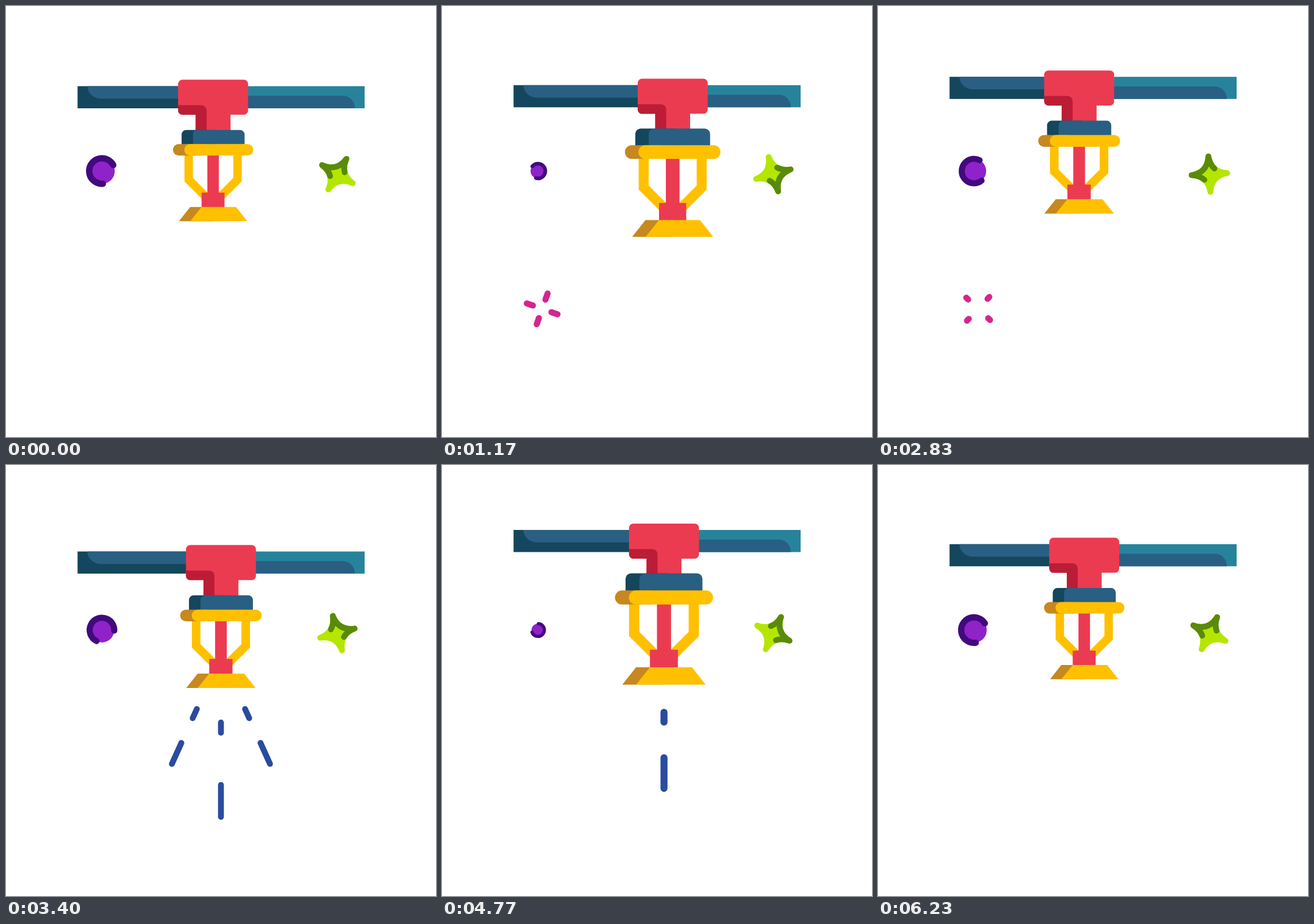
Recreate the animation shown at these times as an HTML page with a canvas. Size 747 px wide and 750 px high, loop 6.26 s.

```html
<!DOCTYPE html>
<html>
<head>
<meta charset="utf-8">
<style>
html, body { margin: 0; width: 100%; height: 100%; overflow: hidden; background: #fff; }
canvas { display: block; }
</style>
</head>
<body>
<canvas id="stage" width="747" height="750"></canvas>
<script>
const LOOP = 6260, STEPS = 188, CYCLE = 94, BURST = 47;
const RED = '#eb3b50', CRIMSON = '#bb1d37', BLUE = '#295f82', NAVY = '#14465d', TEAL = '#27839c';
const YELLOW = '#ffc000', OCHRE = '#c6881f', WATER = '#2a4b9f', PINK = '#d6258f';
const VIOLET = '#9022c9', INDIGO = '#420a7d', LIME = '#b4e600', MOSS = '#5a8a0a';
const c = document.getElementById('stage').getContext('2d');
const rad = deg => deg * Math.PI / 180;
const wave = (step, peak) => Math.cos(2 * Math.PI * (step - peak) / CYCLE);

// Quadratic ease-out over ten steps
function ease(t) {
  const x = Math.min(1, Math.max(0, t / 10));
  return 1 - (1 - x) ** 2;
}

function box(color, x, y, w, h, r = 0) {
  c.fillStyle = color;
  c.beginPath();
  c.roundRect(x, y, w, h, r);
  c.fill();
}

function poly(color, ...pts) {
  c.fillStyle = color;
  c.beginPath();
  for (const [x, y] of pts) c.lineTo(x, y);
  c.fill();
}

function group(x, y, draw) {
  c.save();
  c.translate(x, y);
  draw();
  c.restore();
}

function pen(color, width) {
  c.strokeStyle = color;
  c.lineWidth = width;
  c.lineCap = c.lineJoin = 'round';
}

// Line of which only the part between tail and front shows
function trimmed([x1, y1, x2, y2], tail, front) {
  const at = p => [x1 + (x2 - x1) * p, y1 + (y2 - y1) * p];
  const [ex, ey] = at(front);
  c.beginPath();
  c.moveTo(...at(tail));
  c.lineTo(ex, ey + 0.01);
  c.stroke();
}

function pipe(top) {
  group(0, top, () => {
    const h = 38.5;
    box(NAVY, 124.3, 0, 250, h);
    box(TEAL, 374, 0, 249, h);
    c.fillStyle = BLUE;
    c.beginPath();
    c.moveTo(141.5, 0);
    c.bezierCurveTo(141.5, 12, 152, 21.7, 165, 21.7);
    c.lineTo(375, 21.7);
    c.lineTo(375, 0);
    c.fill();
    c.beginPath();
    c.moveTo(374, 16.7);
    c.lineTo(585, 16.7);
    c.bezierCurveTo(597, 16.7, 606, 26, 606, h);
    c.lineTo(374, h);
    c.fill();
  });
}

function tee(x, y) {
  group(x, y, () => {
    c.beginPath();
    c.roundRect(-60.8, 0, 121.6, 61, 7.5);
    c.rect(-30.3, 50, 60.6, 42);
    c.fillStyle = RED;
    c.fill();
    c.clip();
    box(CRIMSON, -70, 44.3, 58.7, 60, [0, 9, 0, 0]);
  });
}

function head() {
  box(NAVY, -54.7, 0, 60, 25, [8, 0, 0, 0]);
  box(BLUE, -35, 0, 89.7, 25, [8, 8, 0, 0]);
  c.strokeStyle = YELLOW;
  c.lineWidth = 14.6;
  c.lineCap = 'butt';
  c.lineJoin = 'miter';
  for (const side of [-1, 1]) {
    c.beginPath();
    c.moveTo(side * 42.4, 40);
    c.lineTo(side * 42.4, 86.5);
    c.lineTo(side * 5, 123.9);
    c.stroke();
  }
  box(RED, -10, 40, 20, 75);
  box(OCHRE, -69.8, 24.5, 60, 20, 10);
  box(YELLOW, -50, 24.5, 119.8, 20, 10);
  box(RED, -20, 109, 39.8, 25.5);
  poly(OCHRE, [-39.8, 134], [0, 134], [0, 158.7], [-59.3, 158.7]);
  poly(YELLOW, [-20, 134], [39.8, 134], [59.3, 158.7], [-39.7, 158.7]);
}

// Each jet: start step, then its dashes
const jets = [
  [0, [0, 193.7, 0, 232.5], [0, 258.3, 0, 380]],
  [5, [-41.2, 190.2, -55.3, 221.2], [-67.7, 248.4, -99.5, 318.8],
      [41.2, 190.2, 55.3, 221.2], [67.7, 248.4, 99.5, 318.8]],
  [10, [-61.6, 170.3, -86.6, 199.5], [-98.3, 213.2, -124.4, 243.8],
       [66.4, 170.5, 89, 196.9], [100.3, 210.2, 129.5, 244.1]]
];

function water(phase) {
  pen(WATER, 10);
  for (const [start, ...dashes] of jets) {
    const t = phase - start;
    if (t > 0 && t <= 15) for (const d of dashes) trimmed(d, ease(t - 5), ease(t));
  }
}

function spark(step, phase) {
  if (phase <= 19 || phase > 43) return;
  group(174, 527, () => {
    c.rotate(rad(35.7 - 45 * wave(step, 17)));
    pen(PINK, 10.6);
    for (let i = 0; i < 4; i++) {
      c.rotate(Math.PI / 2);
      trimmed([10.7, 0, 28.3, 0], ease(phase - 33), ease(phase - 19));
    }
  });
}

function ring(step) {
  group(166.7, 287.2, () => {
    const s = 0.75 + 0.25 * wave(step, 0);
    c.scale(s, s);
    c.rotate(rad(29 + 360 * step / CYCLE));
    c.fillStyle = VIOLET;
    c.beginPath();
    c.arc(0, 0, 22.2, 0, 7);
    c.fill();
    pen(INDIGO, 11);
    c.beginPath();
    c.arc(0, 0, 22.2, rad(57), rad(303));
    c.stroke();
  });
}

function star(step) {
  const tip = 31, dip = 3, waist = tip / 4 + dip / 2, bend = (tip + dip) / 2;
  group(575.7, 292.6, () => {
    // Local axes: the dark tips lie at 0 and 90 degrees
    c.rotate(rad(-57 + 88.3 * wave(step, 32) - 45));
    c.beginPath();
    c.moveTo(tip, 0);
    c.quadraticCurveTo(dip, dip, 0, tip);
    c.quadraticCurveTo(-dip, dip, -tip, 0);
    c.quadraticCurveTo(-dip, -dip, 0, -tip);
    c.quadraticCurveTo(dip, -dip, tip, 0);
    c.closePath();
    pen(LIME, 10);
    c.fillStyle = LIME;
    c.fill();
    c.stroke();
    pen(MOSS, 10);
    c.beginPath();
    c.moveTo(waist, -waist);
    c.quadraticCurveTo(bend, -dip / 2, tip, 0);
    c.quadraticCurveTo(dip, dip, 0, tip);
    c.quadraticCurveTo(-dip / 2, bend, -waist, waist);
    c.stroke();
  });
}

function frame(now) {
  const step = Math.floor(now % LOOP / LOOP * STEPS + 0.1) % STEPS;
  const phase = step % BURST;
  const x = 374.3 + 27 * wave(step, 32);
  const y = 116.7 + 27.5 * wave(step, 17);
  const size = 1 + 0.111 * (1 - wave(step, 0));
  c.fillStyle = '#fff';
  c.fillRect(0, 0, 747, 750);
  pipe(y + 11.2);
  tee(x, y);
  group(x, y + 92, () => {
    c.scale(size, size);
    water(phase);
    c.translate(0, -4.5);
    head();
  });
  ring(step);
  star(step);
  spark(step, phase);
}

const begin = performance.now();
function tick() {
  frame(performance.now() - begin);
  requestAnimationFrame(tick);
}
tick();
</script>
</body>
</html>
```
